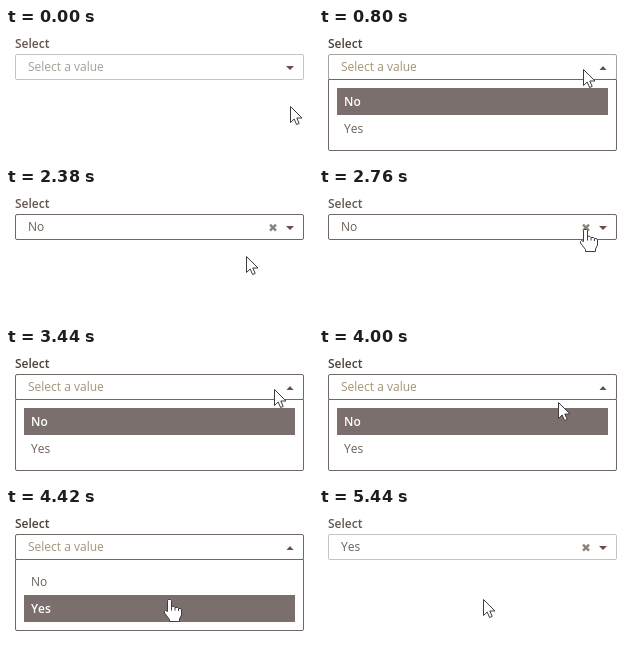
Recreate the animation shown at these times as an HTML page. Size 307x132 px, loop 8420 ms.

```html
<!DOCTYPE html>
<html lang="en">
<head>
<meta charset="utf-8">
<title>Select box</title>
<style>
  html, body { margin: 0; width: 100%; height: 100%; overflow: hidden; background: #fff; }
  svg { display: block; width: 307px; height: 132px; }
  text { font: 12px "Open Sans", "Noto Sans", sans-serif; font-kerning: none; fill: #6b5f58; }
  #label { font-weight: 600; fill: #65544e; }
  #box, #panel { fill: #fff; stroke: #716662; }
  #caret { fill: #6b4d46; }
  #clear { stroke: #8d827b; stroke-width: 2.4; }
  #mark { fill: #7b6f6e; }
  .item.active { font-weight: 600; fill: #fff; }
  #arrow, #hand { fill: #fff; stroke: #3c3c42; stroke-linejoin: round; }
</style>
</head>
<body>
<svg viewBox="0 0 307 132">
  <text id="label" x="9" y="20">Select</text>
  <rect id="box" x="9.5" y="26.5" width="288" height="25" rx="1.5"/>
  <text id="value" x="22" y="43"></text>
  <path id="clear" d="M264 36.7l6 6m0-6l-6 6"/>
  <path id="caret"/>
  <g id="list">
    <path id="panel" d="M9.5 51.5h288v69.5q0 1.5 -1.5 1.5h-285q-1.5 0 -1.5 -1.5z"/>
    <rect id="mark" x="18" width="271" height="27"/>
    <text class="item" x="25" y="78">No</text>
    <text class="item" x="25" y="105">Yes</text>
  </g>
  <g id="cursor">
    <path id="arrow" d="M.5 .5v16l3.7-3.5 2.4 5.5 2.6-1.1-2.4-5.4h5.2z"/>
    <path id="hand" d="M-2.5 12.5V1.5l1-1h2l1 1V7l2.5.5 1 1 2.5 0 1 1h2l1 1.5v5l-2 4v2.5h-10v-2l-5-6.5v-1.5l1-1z
      M1.5 7v4.5M5 8.5v3M8.5 9.5v2.5"/>
  </g>
</svg>
<script>
  const LOOP = 8420, STEP = 20;
  const $ = id => document.getElementById(id);
  const items = [...document.querySelectorAll('.item')];
  const names = items.map(item => item.textContent);

  // time, x, y of the pointer tip
  const path = [
    [0, 284, 78], [420, 284, 78], [620, 264, 41], [1080, 264, 41],
    [1240, 242, 62], [1340, 240, 68], [2380, 240, 68], [2760, 267, 41],
    [2900, 267, 41], [3020, 268, 41], [3860, 268, 41],
    [4240, 190, 75], [4420, 164, 91], [LOOP, 164, 91]
  ];

  // time, list open, chosen item
  const states = [
    [0, false, -1], [800, true, -1], [1560, false, 0],
    [2920, false, -1], [3440, true, -1], [4760, false, 1]
  ];

  const ramp = (t, a, b) => Math.min(1, Math.max(0, (t - a) / (b - a)));
  const mix = (a, b, k) => a.map((v, i) => Math.round(v + (b[i] - v) * k));
  const show = (el, on) => el.style.display = on ? '' : 'none';

  function pointAt(t) {
    const i = path.findIndex(p => p[0] > t);
    const [t0, ...from] = path[i - 1];
    const [t1, ...to] = path[i];
    return mix(from, to, ramp(t, t0, t1));
  }

  function draw(time) {
    const t = Math.floor((time % LOOP) / STEP) * STEP;
    const [, open, chosen] = states.filter(s => s[0] <= t).pop();
    const [x, y] = pointAt(t);
    const filled = chosen >= 0;
    const active = open && y >= 87 ? 1 : 0;
    const overClear = filled && Math.abs(x - 267) < 6 && Math.abs(y - 40) < 6;
    const pointing = overClear || (open && y >= 60);

    const focus = ramp(t, 780, 840) - ramp(t, 5340, 5440);
    $('box').style.stroke = `rgb(${mix([198, 194, 191], [113, 102, 98], focus)})`;
    $('value').textContent = filled ? names[chosen] : 'Select a value';
    $('value').style.fill = filled ? '#6b5f58' : open ? '#a39476' : '#a59e97';
    $('label').style.fill = open ? '#4a403a' : '#65544e';
    $('caret').setAttribute('d', open ? 'M280.5 42h7l-3.5-4z' : 'M280 38h8l-4 4z');
    show($('clear'), filled);
    show($('list'), open);
    $('mark').setAttribute('y', 60 + 27 * active);
    items.forEach((item, i) => item.classList.toggle('active', i === active));

    $('cursor').setAttribute('transform', `translate(${x} ${y})`);
    show($('hand'), pointing);
    show($('arrow'), !pointing);
  }

  const start = performance.now();
  function tick() {
    draw(performance.now() - start);
    requestAnimationFrame(tick);
  }
  tick();
</script>
</body>
</html>
```
